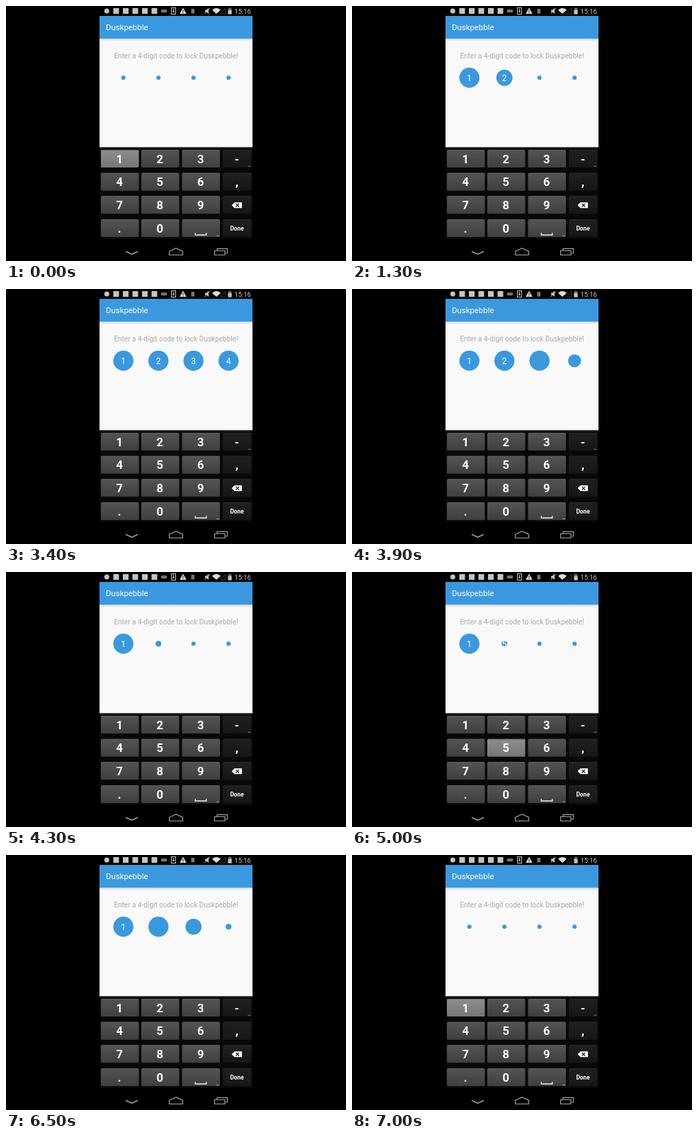
Animation of 480 by 360 pixels, one loop 8000 ms. Source, as an HTML page with a canvas:

```html
<!DOCTYPE html>
<html lang="en">
<head>
<meta charset="utf-8">
<title>Code lock</title>
<style>
html, body { margin: 0; width: 100%; height: 100%; overflow: hidden; background: #000; }
canvas { display: block; }
</style>
</head>
<body>
<canvas id="stage" width="480" height="360"></canvas>
<script>
const ctx = document.getElementById('stage').getContext('2d');
const LOOP = 8000, MORPH = 300;
const BLUE = '#3a99de';
const APP = 'Duskpebble';
const SLOTS = [165.7, 215.2, 264.7, 314.2], SLOT_Y = 101.3;
const COLS = [134, 191, 248.5, 306], ROWS = [203, 235.7, 268.3, 301.3];
const KEYS = ['123-', '456,', '789<', '.0_>'];

// Each entry: slot, digit, start of growth, moment the digit is erased
const ENTRIES = [
  [0, '1', 400, 6600],
  [1, '2', 1100, 4000],
  [2, '3', 1600, 3840],
  [3, '4', 2100, 3700],
  [1, '5', 4940, 6480],
  [2, '5', 5180, 6340],
  [3, '6', 5400, 6200],
];

// Each press: key, down, up
const PRESSES = [
  ['1', 0, 200], ['2', 800, 1000], ['3', 1400, 1500], ['4', 1800, 2000],
  ['<', 2700, 3400], ['<', 3500, 3600], ['<', 3700, 3800],
  ['5', 4400, 4700], ['5', 4950, 5080], ['6', 5180, 5290],
  ['<', 5700, 6050], ['<', 6140, 6200], ['<', 6280, 6340], ['<', 6420, 6490],
  ['1', 6950, LOOP],
];

const clamp = v => Math.min(1, Math.max(0, v));
const ease = v => (1 - Math.cos(Math.PI * clamp(v))) / 2;

function rect(x, y, w, h, fill) {
  ctx.fillStyle = fill;
  ctx.fillRect(x, y, w, h);
}

function rounded(x, y, w, h, r, fill) {
  ctx.fillStyle = fill;
  ctx.beginPath();
  ctx.roundRect(x, y, w, h, r);
  ctx.fill();
}

function disc(x, y, r, fill) {
  ctx.fillStyle = fill;
  ctx.beginPath();
  ctx.arc(x, y, r, 0, Math.PI * 2);
  ctx.fill();
}

function path(points, color, width, close, filled) {
  ctx.beginPath();
  points.forEach(([x, y]) => ctx.lineTo(x, y));
  if (close) ctx.closePath();
  if (filled) {
    ctx.fillStyle = color;
    ctx.fill();
  } else {
    ctx.strokeStyle = color;
    ctx.lineWidth = width;
    ctx.stroke();
  }
}

function text(str, x, y, size, color, align = 'center', weight = 400) {
  ctx.font = `${weight} ${size}px Roboto, sans-serif`;
  ctx.textAlign = align;
  ctx.fillStyle = color;
  ctx.fillText(str, x, y);
}

function vertical(y, h, top, bottom) {
  const g = ctx.createLinearGradient(0, y, 0, y + h);
  g.addColorStop(0, top);
  g.addColorStop(1, bottom);
  return g;
}

function statusBar() {
  const light = '#c4c4c4', dim = '#777';
  disc(142.3, 7, 3.5, light);
  for (let i = 0; i < 5; i++) rect(151.5 + i * 13.5, 3, 8, 8, light);
  rounded(219, 5, 8, 4, 1, '#888');
  rect(220, 6.5, 6, 0.7, '#333');
  ctx.strokeStyle = light;
  ctx.lineWidth = 1;
  ctx.strokeRect(233.5, 2.5, 6, 9);
  path([[236.5, 4], [236.5, 8]], light, 1);
  path([[234.7, 7], [238.3, 7], [236.5, 9.5]], light, 0, true, true);
  path([[250, 2.5], [254.7, 11], [245.3, 11]], '#ddd', 0, true, true);
  rect(249.5, 5.5, 1, 3, '#111');
  rect(249.5, 9.2, 1, 1, '#111');
  rect(261.5, 4, 4.5, 6.5, '#777');

  path([[281, 5.5], [283, 5.5], [286, 3], [286, 11], [283, 8.5], [281, 8.5]], light, 0, true, true);
  path([[288, 3], [280.5, 11]], light, 1);
  ctx.fillStyle = '#ddd';
  ctx.beginPath();
  ctx.moveTo(297, 11);
  ctx.arc(297, 11, 8, -Math.PI * 0.77, -Math.PI * 0.23);
  ctx.fill();
  path([[310, 3], [310, 11], [303, 11]], '#3c3c3c', 1, true);
  rect(313.5, 3.5, 5, 8, dim);
  rect(314.7, 2.5, 2.6, 1, dim);
  rect(313.5, 6, 5, 5.5, light);
  text('15:16', 322.5, 11, 9.4, '#cfcfcf', 'left');
}

function appPage() {
  rect(132, 14, 216, 186, '#f9f9f9');
  rect(132, 46, 216, 4, vertical(46, 4, '#cfd3d6', '#f9f9f9'));
  rect(132, 14, 216, 32, BLUE);
  text(APP, 141, 34.3, 11.4, '#fff', 'left');
  text(`Enter a 4-digit code to lock ${APP}!`, 240, 73.5, 10, '#a9a9a9');
}

function slots(t) {
  SLOTS.forEach((x, slot) => {
    let size = 0, label = '';
    for (const [s, digit, start, erased] of ENTRIES) {
      if (s !== slot || t < start) continue;
      size = ease((t - start) / MORPH) * (1 - ease((t - erased - 60) / MORPH));
      label = t < erased ? digit : '';
    }
    disc(x, SLOT_Y, 3 + 11.2 * size, BLUE);
    if (label) text(label, x, SLOT_Y + 4.3, 12, '#fff');
  });
}

function backspace(x, y) {
  path([[x - 7.5, y], [x - 3.5, y - 4], [x + 7, y - 4], [x + 7, y + 4], [x - 3.5, y + 4]],
    '#fff', 0, true, true);
  path([[x - 1.5, y - 2.2], [x + 3, y + 2.2]], '#222', 1.3);
  path([[x + 3, y - 2.2], [x - 1.5, y + 2.2]], '#222', 1.3);
}

function drawKey(label, col, row, lit) {
  const side = col === 3;
  const x = COLS[col], y = ROWS[row], w = side ? 40.5 : 53.5, h = 25;
  const [top, bottom] = lit
    ? (side ? ['#7c7c7c', '#5c5c5c'] : ['#8e8e8e', '#767676'])
    : (side ? ['#202020', '#161616'] : ['#545454', '#3f3f3f']);
  rounded(x, y, w, h, 1.5, vertical(y, h, top, bottom));
  rect(x + 1, y, w - 2, 0.8, side ? '#2b2b2b' : '#626262');

  const cx = x + w / 2 - (side ? 0.2 : 0.5), cy = y + h / 2;
  if (label === '<') {
    backspace(cx, cy + 0.5);
  } else if (label === '_') {
    path([[cx - 7.5, cy + 6.5], [cx - 7.5, cy + 9.5], [cx + 8, cy + 9.5], [cx + 8, cy + 6.5]], '#eee', 1.4);
    rect(x + w - 5, y + h - 2.2, 4, 1, '#999');
  } else if (label === '>') {
    text('Done', cx, cy + 3.2, 8.3, '#fff', 'center', 700);
  } else {
    text(label, cx, cy + 6, 16.5, '#fff', 'center', 700);
    if (label === '-') rect(x + w - 5, y + h - 2.2, 4, 1, '#777');
  }
}

function keyboard(t) {
  rect(132, 199.5, 216, 130, '#080808');
  rect(132, 199.5, 216, 1.5, '#1d291d');
  const held = PRESSES.filter(([, down, up]) => t >= down && t < up).map(p => p[0]);
  KEYS.forEach((line, row) =>
    [...line].forEach((label, col) => drawKey(label, col, row, held.includes(label))));
}

function navBar() {
  rect(132, 329, 216, 31, '#000');
  const gray = '#a0a0a0';
  path([[169, 346.5], [177.5, 350.5], [186, 346.5]], gray, 1.5);
  path([[230.5, 346.5], [240, 342], [249.5, 346.5], [249.5, 351.5], [230.5, 351.5]], gray, 1.2, true);
  path([[298, 345], [298, 342.7], [312.5, 342.7], [312.5, 349], [309.5, 349]], gray, 1.2);
  path([[294.5, 345.5], [309, 345.5], [309, 351.5], [294.5, 351.5]], gray, 1.2, true);
}

function draw(t) {
  rect(0, 0, 480, 360, '#000');
  statusBar();
  appPage();
  slots(t);
  keyboard(t);
  navBar();
}

const begin = performance.now();
function tick() {
  draw((performance.now() - begin) % LOOP);
  requestAnimationFrame(tick);
}
tick();
</script>
</body>
</html>
```
